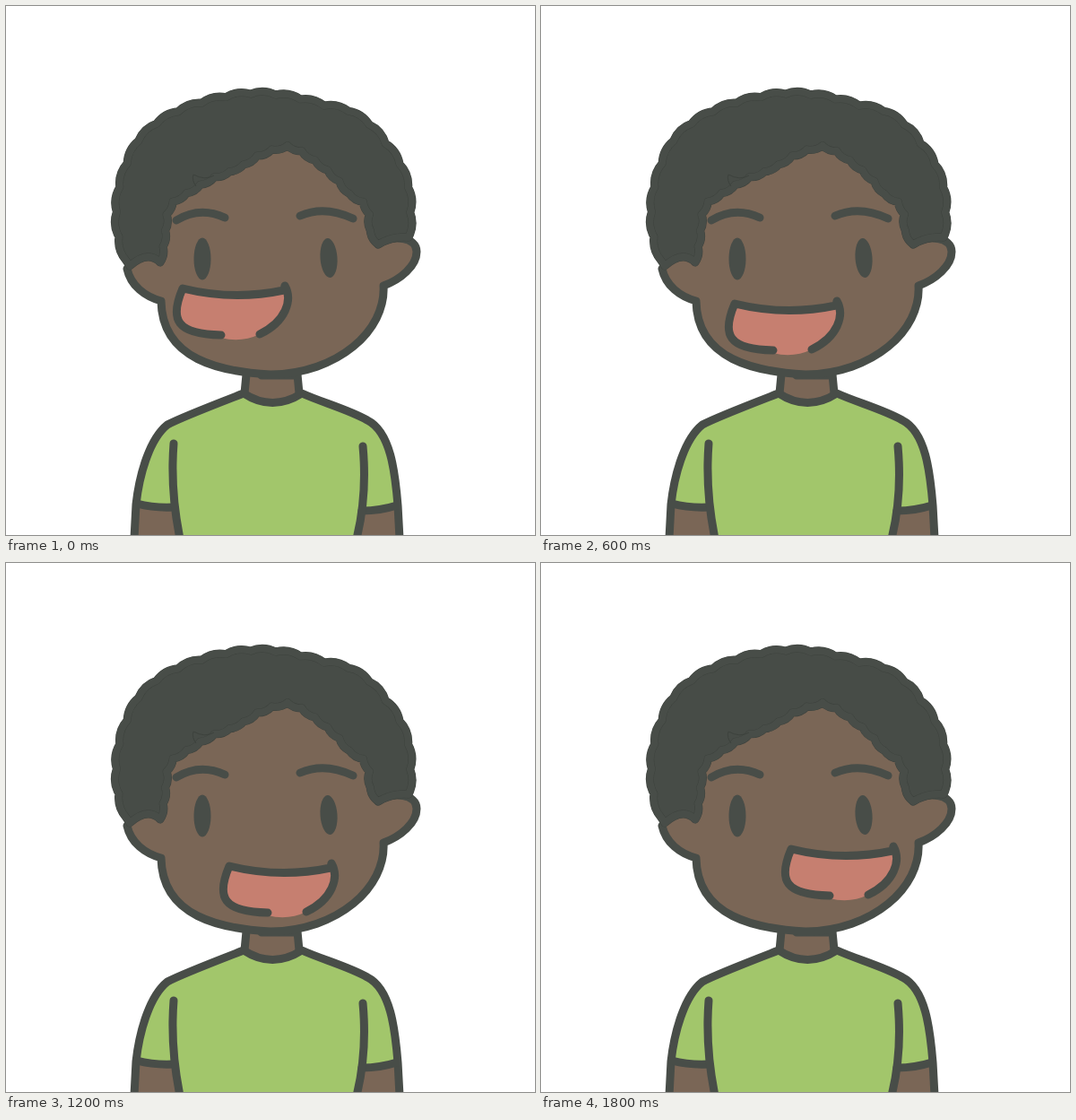
Write an HTML page that moves like this. It is 590 by 590 pixels and loops after 2000 ms.

```html
<!DOCTYPE html>
<html lang="en">
<head>
<meta charset="utf-8">
<title>Moving smile</title>
<style>
  html, body { margin: 0; width: 100%; height: 100%; overflow: hidden; background: #fff; }
  svg { display: block; width: 590px; height: 590px; }
  .line { fill: none; stroke: #484d48; stroke-width: 9; stroke-linecap: round; stroke-linejoin: round; }
  .skin { fill: #7a6656; }
  .shirt { fill: #a2c66b; }
  .dark { fill: #484d48; }
  .hair { fill: #474c47; stroke: #3d423d; stroke-width: 9; stroke-linejoin: round; }
  .rim { stroke-width: 8; }
  .crease { fill: none; stroke: #3d423d; }
</style>
</head>
<body>
<svg viewBox="0 0 590 590">
  <defs>
    <path id="crown" d="M134 284C116 240 122 200 143 158C160 125 215 103 272 98C300 98 325 100 347 111C385 110 410 130 430 164C452 188 453 220 449 258"/>
    <path id="fringe" d="M415 266L406 250L405 222L384 211Q368 185 319 155Q282 160 258 183Q236 186 211 203L180 222L177 258L172 286"/>
  </defs>

  <!-- arms, neck and shirt -->
  <path class="skin" d="M145 555L143 594H194L187 559ZM436 558L439 594H390L396 563ZM268 408L266 434Q297 455 328 434L325 408Z"/>
  <g id="shirt">
    <path class="shirt" d="M145 556C149 520 161 482 180 467Q195 459 265 432Q297 453 330 432C352 442 382 450 403 462C429 475 434 520 437 557L397 563L391 594H194L186 559Z"/>
    <path class="line" d="M143 594L145 556C149 520 161 482 180 467Q195 459 265 432Q297 453 330 432C352 442 382 450 403 462C429 475 434 520 437 557L439 594"/>
    <path class="line" d="M146 555Q165 560 186 559M436 557Q417 563 397 563"/>
    <path class="line" d="M187 488Q183 540 194 594M398 491Q403 546 391 594"/>
  </g>
  <path class="line" d="M268 411L266 432M325 411L327 432M285 412H322"/>

  <!-- head -->
  <path class="skin" d="M135 293C139 312 155 324 173 329C174 395 240 408 295 411C370 410 424 362 421 312C440 305 458 290 458 274C458 258 432 254 415 266L405 190L320 145L200 180L160 270Z"/>
  <path class="line" d="M135 293C139 312 155 324 173 329C174 395 240 408 295 411C370 410 424 362 421 312C440 305 458 290 458 274C458 258 432 254 415 266"/>
  <path class="hair"/>
  <path class="line rim"/>
  <path class="crease" d="M232 189Q222 195 209 188Q207 195 212 201"/>

  <path class="line" d="M190 239Q216 223 244 236M328 234Q355 222 387 237"/>
  <ellipse class="dark" cx="219" cy="282" rx="9.5" ry="23.5"/>
  <ellipse class="dark" cx="360" cy="281" rx="9.5" ry="22" transform="rotate(-4 360 281)"/>

  <g id="mouth">
    <path fill="#c67f70" d="M240 367C190 366 182 350 197 315Q254 329 310 317L311 312C320 328 312 352 283 366Q262 376 240 370Z"/>
    <path class="line" d="M240 367C190 366 182 350 197 315Q254 329 310 317L311 312C320 328 312 352 283 366"/>
  </g>
</svg>
<script>
  const $ = selector => document.querySelector(selector);

  // Lay round curls of about the given size along a guide path.
  function curls(guide, size) {
    const length = guide.getTotalLength();
    const count = Math.round(length / size);
    const r = size * 1.2;
    const { x, y } = guide.getPointAtLength(0);
    let d = `${x} ${y}`;
    for (let i = 1; i <= count; i++) {
      const p = guide.getPointAtLength(length * i / count);
      d += `A${r} ${r} 0 0 1 ${p.x} ${p.y}`;
    }
    return d;
  }

  const hair = `M${curls($('#crown'), 28)}Q432 256 ${curls($('#fringe'), 18)}Q158 272 138 290Z`;
  $('.hair').setAttribute('d', hair);
  $('.rim').setAttribute('d', hair);

  // The mouth swings through a shallow dip in ten held steps.
  const STEPS = 10;
  const path = [
    { at: 0, x: 0, y: 0 },
    { at: 3, x: 19, y: 17 },
    { at: 5, x: 40, y: 27 },
    { at: 7, x: 64, y: 18 },
    { at: 9, x: 82, y: 4 }
  ];

  function place(step) {
    const next = Math.max(1, path.findIndex(p => p.at >= step));
    const a = path[next - 1], b = path[next];
    const k = (step - a.at) / (b.at - a.at);
    const mix = axis => Math.round(a[axis] + (b[axis] - a[axis]) * k);
    return `translate(${mix('x')}px, ${mix('y')}px)`;
  }

  const frames = Array.from({ length: STEPS + 1 }, (_, i) => ({
    transform: place(Math.min(i, STEPS - 1)),
    offset: i / STEPS,
    easing: 'steps(1, end)'
  }));
  $('#mouth').animate(frames, { duration: 2000, iterations: Infinity });
</script>
</body>
</html>
```
